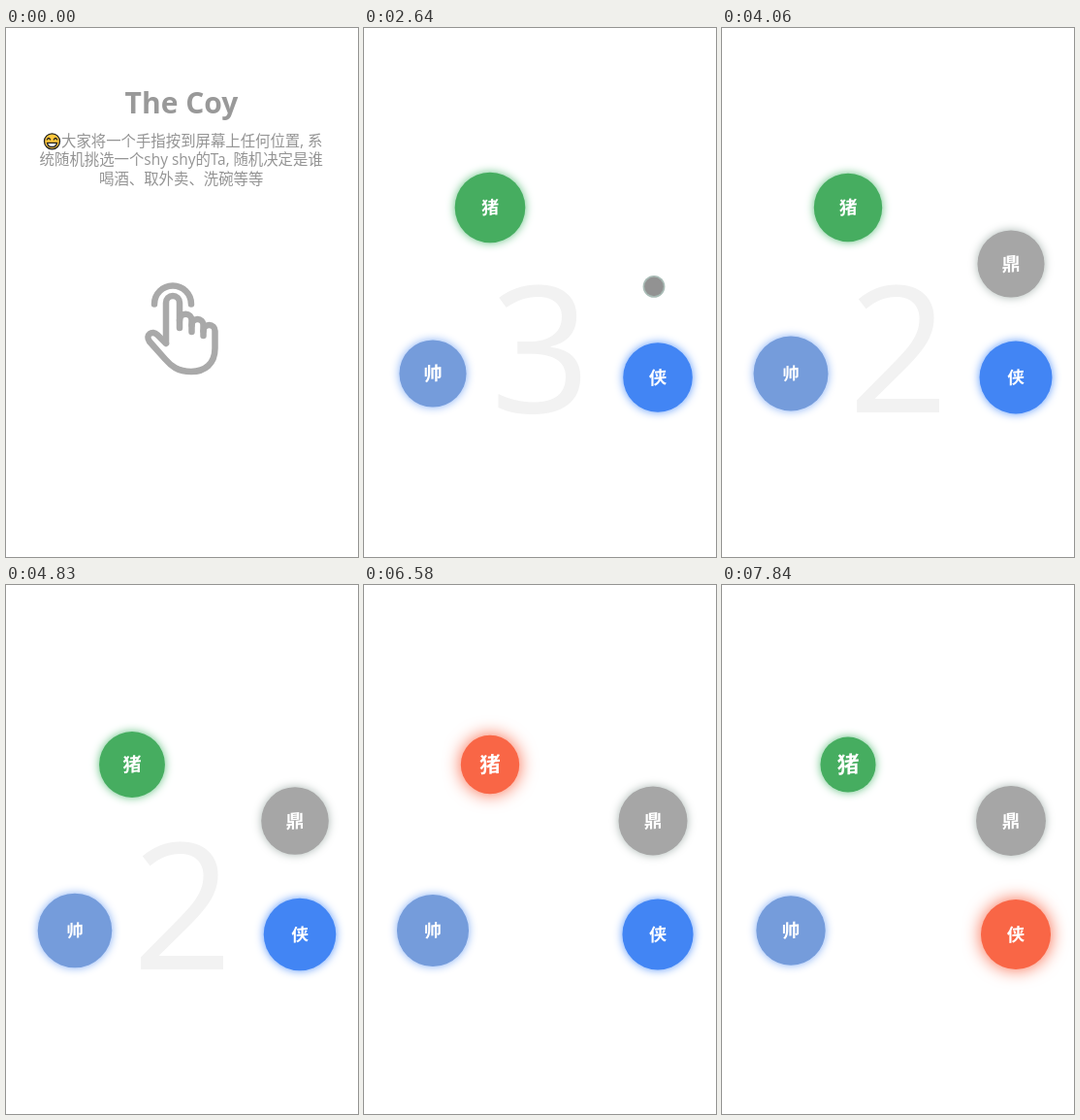
These frames come from a looping animation (363 px wide and 545 px high, 7990 ms). An HTML page:

```html
<!DOCTYPE html>
<html lang="zh-CN">
<head>
<meta charset="utf-8">
<title>Finger picker</title>
<style>
  html, body { margin: 0; width: 100%; height: 100%; overflow: hidden; background: #fff; }
  svg { display: block; width: 100vw; height: 100vh; }
  text { font-family: "Open Sans", "Noto Sans CJK SC", "Noto Sans CJK", sans-serif; }
  .mid { text-anchor: middle; }
  .title { font-size: 30px; font-weight: 700; fill: #999; }
  .body { font-size: 15.4px; fill: #949494; }
  .count { font-size: 181px; fill: #f2f2f2; }
  .label { font-size: 20px; font-weight: 700; fill: #fff; }
  .icon { fill: none; stroke: #a9a9a9; stroke-width: 6.5; stroke-linecap: round; stroke-linejoin: round; }
</style>
</head>
<body>
<svg viewBox="0 0 363 545">
  <g id="intro">
    <text class="title mid" x="181" y="88">The Coy</text>
    <g fill="none" stroke="#222" stroke-width="1.3" stroke-linecap="round">
      <circle cx="47.5" cy="116.8" r="8" fill="#ffc83d"/>
      <path d="M42.3 115q1.7-3 3.4 0M49.3 115q1.7-3 3.4 0"/>
      <path d="M42.5 118.3h10q-.8 4.2-5 4.2t-5-4.2z" fill="#fff"/>
    </g>
    <text class="body" x="57" y="122.3">大家将一个手指按到屏幕上任何位置, 系</text>
    <text class="body mid" x="180.7" y="141.3">统随机挑选一个shy shy的Ta, 随机决定是谁</text>
    <text class="body mid" x="180.7" y="161">喝酒、取外卖、洗碗等等</text>
    <g class="icon">
      <path d="M153 284.5a19 19 0 0 1 38 0"/>
      <path d="M165 324V283a7 7 0 0 1 14 0V309"/>
      <path d="M179 301a6.2 6.2 0 0 1 12.5 0V313"/>
      <path d="M191.5 306a6 6 0 0 1 12 0V317"/>
      <path d="M203.5 312a6 6 0 0 1 12 0V330C215.5 346 205 354 191 354C177 354 170 348 164 341L148 323C143 316 151 311 156 316L165 325"/>
    </g>
  </g>
  <text id="count" class="count mid" x="182" y="396"></text>
  <g id="players"></g>
  <g id="cursor">
    <circle r="11.4" fill="#a9bcb6"/>
    <circle r="9.8" fill="#929292"/>
  </g>
</svg>
<script>
const LOOP = 7990, STEP = 157.55, RED = '#f96646';
const APPEAR = 180, COUNT = 1250, PICK_START = 6500, PICK = 550;
const $ = id => document.getElementById(id);

// from/to: when the finger travels here; bend: how far its path sags.
// beat/zero: pulse period and a moment of full size.
const players = [
  { name: '猪', x: 130, y: 185, color: '#46ad60', glow: '#62c080', from: 120, to: 750, bend: 0, beat: 606, zero: 1520 },
  { name: '帅', x: 71, y: 356, color: '#759cdb', glow: '#82adf5', from: 1065, to: 1540, bend: 0, beat: 647, zero: 2777 },
  { name: '侠', x: 303, y: 360, color: '#4285f4', glow: '#5c98fa', from: 1853, to: 2200, bend: 150, beat: 624, zero: 2747 },
  { name: '鼎', x: 298, y: 243, color: '#a6a6a6', glow: '#a9b5b1', from: 2370, to: 2860, bend: 0, beat: 635, zero: 3925 }
];
const stops = [{ x: 264, y: 515 }, ...players, { x: 243, y: 528, from: 3200, to: 3590, bend: 0 }];
const leave = 3700;

const clamp = v => Math.min(1, Math.max(0, v));
const easeOut = k => 1 - (1 - k) ** 2;

function make(tag, parent, attrs = {}) {
  const el = document.createElementNS('http://www.w3.org/2000/svg', tag);
  for (const key in attrs) el.setAttribute(key, attrs[key]);
  return parent.appendChild(el);
}

function show(el, on) {
  el.style.display = on ? '' : 'none';
}

function finger(t) {
  let { x, y } = stops[0];
  for (const s of stops.slice(1)) {
    const k = easeOut(clamp((t - s.from) / (s.to - s.from)));
    x += (s.x - x) * k;
    y += (s.y - y) * k + 2 * k * (1 - k) * s.bend;
  }
  return `translate(${x} ${y})`;
}

function drawPlayer(p, t, hot) {
  const grow = clamp((t - p.to - APPEAR) / 150);
  const r = 33.25 + 5.25 * Math.cos(2 * Math.PI * (t - p.zero) / p.beat);
  show(p.group, grow > 0);
  p.group.setAttribute('transform', `translate(${p.x} ${p.y}) scale(${grow})`);
  p.disc.setAttribute('r', r);
  p.disc.setAttribute('fill', hot ? RED : p.color);
  p.disc.style.filter = `drop-shadow(0 0 ${hot ? 9 : 5}px ${hot ? RED : p.glow})`;
  p.label.setAttribute('transform', `scale(${33 / r}) skewY(-5)`);
}

for (const p of players) {
  p.group = make('g', $('players'));
  p.disc = make('circle', p.group);
  p.label = make('text', p.group, { class: 'label mid', y: 7.2 });
  p.label.textContent = p.name;
}

function draw(time) {
  // The scene advances in even ticks.
  const t = time < 120 ? 0 : 120 + STEP * Math.floor((time - 105) / STEP);
  const started = t > players[0].to + APPEAR;
  const left = Math.min(3, Math.ceil((PICK_START - t) / COUNT));
  const picked = Math.floor((t - PICK_START) / PICK);

  show($('intro'), !started);
  $('count').textContent = started && left > 0 ? left : '';
  players.forEach((p, i) => drawPlayer(p, t, i === picked));
  show($('cursor'), t >= players[0].from && t < leave);
  $('cursor').setAttribute('transform', finger(t));
}

const begin = performance.now();
function tick() {
  draw((performance.now() - begin) % LOOP);
  requestAnimationFrame(tick);
}
tick();
</script>
</body>
</html>
```
